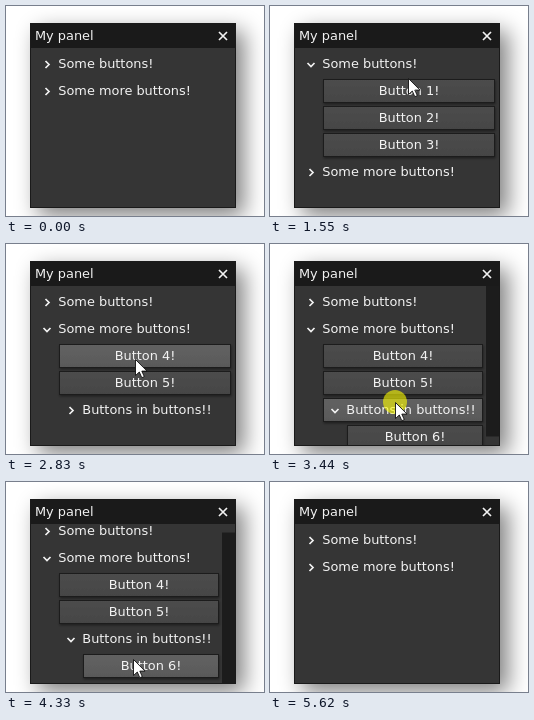
These frames come from a looping animation (258x210 px, 6300 ms). An HTML page:

```html
<!DOCTYPE html>
<html lang="en">
<head>
<meta charset="utf-8">
<title>Foldable panel</title>
<style>
  html, body { margin: 0; width: 100%; height: 100%; overflow: hidden; background: #fff; }
  svg { display: block; }
  text { font: 12.9px "DejaVu Sans", sans-serif; fill: #f2f2f2; }
  .icon { fill: none; stroke: #f2f2f2; stroke-width: 1.7; }
</style>
</head>
<body>
<svg width="258" height="210" viewBox="0 0 258 210">
  <defs>
    <linearGradient id="face" x2="0" y2="1">
      <stop stop-color="#4d4d4d"/><stop offset="1" stop-color="#454545"/>
    </linearGradient>
    <linearGradient id="hover" x2="0" y2="1">
      <stop stop-color="#626262"/><stop offset="1" stop-color="#595959"/>
    </linearGradient>
    <filter id="soft" x="-30%" y="-30%" width="160%" height="160%">
      <feGaussianBlur stdDeviation="11"/>
    </filter>
    <filter id="lift" x="-5%" y="-20%" width="110%" height="150%">
      <feDropShadow dx="0.5" dy="1.5" stdDeviation="1.3" flood-opacity=".4"/>
    </filter>
    <clipPath id="view"><rect x="25" y="42" width="204" height="159"/></clipPath>
  </defs>
  <rect width="258" height="210" fill="#fff"/>
  <rect x="32" y="25" width="206" height="185" opacity=".5" filter="url(#soft)"/>
  <rect x="24" y="17" width="206" height="185" fill="#1a1a1a"/>
  <rect x="25" y="42" width="204" height="159" fill="#353535"/>
  <text x="29" y="34">My panel</text>
  <path class="icon" d="M213 26l8 8m0-8l-8 8"/>
  <g id="content" clip-path="url(#view)"></g>
  <g id="pointer">
    <circle r="12" fill="#ff0" fill-opacity=".6"/>
    <path d="M.5.5V16.5L4.3 13L6.8 18.7L9.3 17.6L6.8 12.1H12Z" fill="#fff" stroke="#111" stroke-width=".9"/>
  </g>
</svg>
<script>
const LOOP = 6300, ROW = 27, ROW_HEIGHT = 24, VIEW_TOP = 42, VIEW_HEIGHT = 159;
const content = document.getElementById('content');
const pointer = document.getElementById('pointer');
const clickDot = pointer.querySelector('circle');

const tree = [
  { label: 'Some buttons!', open: [670, 1690],
    items: ['Button 1!', 'Button 2!', 'Button 3!'] },
  { label: 'Some more buttons!', open: [2360, 5350],
    items: ['Button 4!', 'Button 5!',
      { label: 'Buttons in buttons!!', open: [3440, 4540], items: ['Button 6!'] }] }
];
const clicks = [[670, 810], [1690, 1830], [2360, 2430], [3440, 3580], [4540, 4670], [5350, 5490]];
const visible = [260, 5620];
const scrolled = [3780, 4540];
const entry = [164, 148];

// Each move runs from start to end in whole steps along a polyline.
const moves = [
  { start: 260, end: 540, steps: 5, path: [[142, 82], [138, 60]] },
  { start: 1010, end: 1620, steps: 9, path: [[138, 78], [139, 87], [139, 86], [137, 60]] },
  { start: 2030, end: 2160, steps: 3, path: [[132, 89]] },
  { start: 2630, end: 3140, steps: 8, path: [[125, 158]] },
  { start: 4050, end: 4400, steps: 6,
    path: [[125, 162], [126, 168], [126, 173], [127, 177], [127, 177], [127, 166]] },
  { start: 4740, end: 5080, steps: 6, path: [[128, 89]] }
];

const within = (t, [from, to]) => t >= from && t < to;

function along(points, phase) {
  const place = phase * (points.length - 1);
  const i = Math.min(Math.floor(place), points.length - 2);
  return points[i].map((v, axis) => v + (points[i + 1][axis] - v) * (place - i));
}

function cursorAt(t) {
  let position = entry;
  for (const { start, end, steps, path } of moves) {
    if (t < start) break;
    const step = Math.min(steps, 1 + Math.floor((t - start) / (end - start) * (steps - 1) + 1e-6));
    position = along([position, ...path], step / steps);
  }
  return position.map(Math.round);
}

function layout(items, t, depth = 0, rows = []) {
  for (const item of items) {
    const fold = typeof item === 'object';
    const open = fold && within(t, item.open);
    rows.push({ label: fold ? item.label : item, fold, open, x: 29 + depth * 24 });
    if (open) layout(item.items, t, depth + 1, rows);
  }
  return rows;
}

function rowMarkup({ label, fold, open, x }, y, right, hot) {
  const box = fold && !hot ? '' :
    `<rect x="${x + .5}" y="${y + .5}" width="${right - x - 1}" height="${ROW_HEIGHT - 1}"
      fill="url(#${hot ? 'hover' : 'face'})" stroke="#1c1c1c" filter="url(#lift)"/>`;
  if (!fold) {
    return `${box}<text x="${(x + right) / 2}" y="${y + 16}" text-anchor="middle">${label}</text>`;
  }
  const chevron = open ? 'm-3.5-1.5l3.5 3.5l3.5-3.5' : 'm-1.5-3.5l3.5 3.5l-3.5 3.5';
  return `${box}<path class="icon" d="M${x + 12} ${y + 12.5}${chevron}"/>
    <text x="${x + 23.3}" y="${y + 16}">${label}</text>`;
}

let shown = '';

function render(t) {
  const [cx, cy] = cursorAt(t);
  const active = within(t, visible);
  const rows = layout(tree, t);
  const height = rows.length * ROW + 6;
  const overflow = Math.max(0, height - VIEW_HEIGHT);
  const scroll = within(t, scrolled) ? overflow : 0;
  const right = overflow ? 213 : 225;

  let markup = rows.map((row, i) => {
    const y = 46 + i * ROW - scroll;
    const hot = active && cx >= row.x && cx < right && cy >= y && cy < y + ROW_HEIGHT;
    return rowMarkup(row, y, right, hot);
  }).join('');
  if (overflow) {
    const ratio = VIEW_HEIGHT / height;
    markup += `<rect x="216" y="${VIEW_TOP + scroll * ratio}" width="13"
      height="${VIEW_HEIGHT * ratio}" fill="#1c1c1c"/>`;
  }
  if (markup !== shown) content.innerHTML = shown = markup;

  pointer.setAttribute('transform', `translate(${cx} ${cy})`);
  pointer.setAttribute('visibility', active ? 'visible' : 'hidden');
  clickDot.setAttribute('opacity', clicks.some(span => within(t, span)) ? 1 : 0);
}

const began = performance.now();
function tick() {
  render((performance.now() - began) % LOOP);
  requestAnimationFrame(tick);
}
tick();
</script>
</body>
</html>
```
